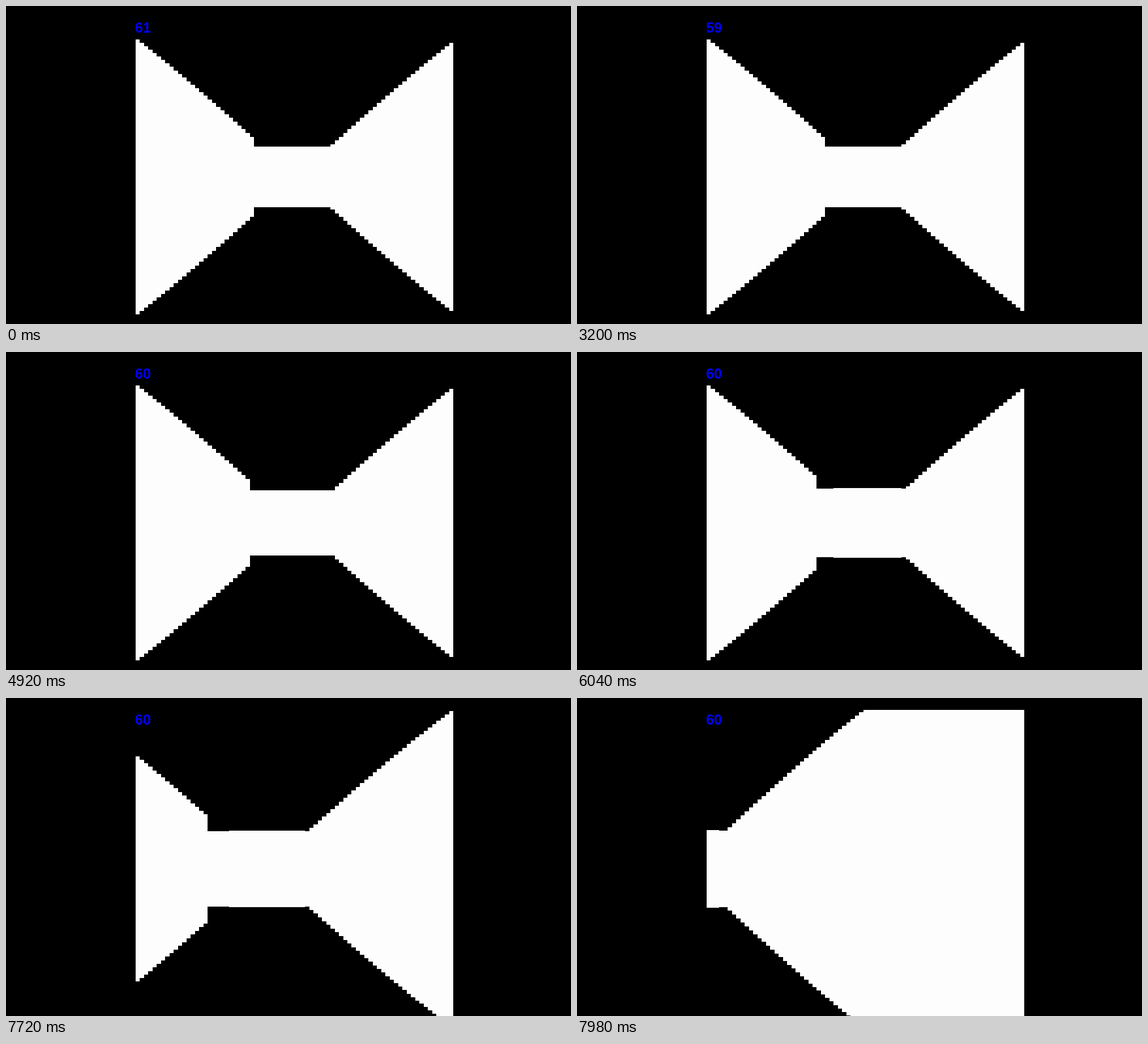
Write an HTML page with a canvas that moves like this. It is 998 px wide and 561 px high and loops after 8000 ms.

```html
<!DOCTYPE html>
<html lang="en">
<head>
<meta charset="utf-8">
<title>Corridor walk</title>
<style>
  html, body { margin: 0; width: 100%; height: 100%; overflow: hidden; background: #000; }
  canvas { position: absolute; left: 0; top: 0; }
  #fps {
    position: absolute; left: 228px; top: 26px;
    font: bold 25px/25px "Liberation Sans", Arial, sans-serif;
    color: #00f;
  }
</style>
</head>
<body>
<canvas id="view" width="998" height="561"></canvas>
<div id="fps"></div>
<script>
const ctx = document.getElementById('view').getContext('2d');
const fps = document.getElementById('fps');

const LOOP = 8000;
const COLS = 75, LEFT = 229, TOP = 21, SIZE = 561;
const MIDDLE = TOP + SIZE / 2;
const RAY = Math.PI / 3 / COLS;       // angle between neighbouring rays
const SIDE = 1 / 484.8;               // distance to either side wall
const FAR = 0.0186;                   // distance to the end wall
const OPENING = 0.0042;               // gap between the left wall's end and the end wall
const SPEED = 0.004 / 97;             // distance walked per tick
const WALK_FROM = 75, TURN_FROM = 166, TURN = 0.1;

// [start time, frame rate shown]
const RATES = [
  [0, 61], [400, 60], [420, 61], [1280, 60], [1380, 61], [3200, 59], [3220, 60],
  [3640, 61], [3660, 60], [5300, 61], [5320, 60], [6700, 61], [6980, 60]
];

// Ticks come in groups of three that last 20, 20 and 100 ms.
function tickAt(time) {
  const t = time + 20, rest = t % 140;
  return 3 * Math.floor(t / 140) + (rest < 20 ? 0 : rest < 40 ? 1 : 2);
}

function playerAt(tick) {
  let forward = 0, right = 0;
  for (let n = WALK_FROM + 1; n <= tick; n++) {
    const a = TURN * Math.max(0, n - TURN_FROM);
    forward += SPEED * Math.cos(a);
    right += SPEED * Math.sin(a);
  }
  return { forward, right, angle: TURN * Math.max(0, tick - TURN_FROM) };
}

// Nearest wall along a ray; positive angles point to the right.
function castRay(angle, player) {
  const far = FAR - player.forward;
  let distance = far / Math.cos(angle);
  if (angle > 0) {
    distance = Math.min(distance, (SIDE - player.right) / Math.sin(angle));
  } else if (angle < 0) {
    const left = SIDE + player.right;
    if (left / Math.tan(-angle) <= far - OPENING) distance = left / Math.sin(-angle);
  }
  return distance;
}

function draw(time) {
  const player = playerAt(tickAt(time));
  ctx.fillStyle = '#000';
  ctx.fillRect(0, 0, 998, 561);
  ctx.fillStyle = '#fdfdfe';
  for (let i = 0; i < COLS; i++) {
    const half = 1 / castRay((i - COLS / 2) * RAY + player.angle, player);
    const x = Math.round(LEFT + i * SIZE / COLS);
    const next = Math.round(LEFT + (i + 1) * SIZE / COLS);
    const y = Math.max(TOP, Math.round(MIDDLE - half));
    ctx.fillRect(x, y, next - x, Math.round(MIDDLE + half) - y);
  }
  fps.textContent = RATES.findLast(([start]) => start <= time)[1];
}

const begin = performance.now();
function frame() {
  draw((performance.now() - begin) % LOOP);
  requestAnimationFrame(frame);
}
frame();
</script>
</body>
</html>
```
